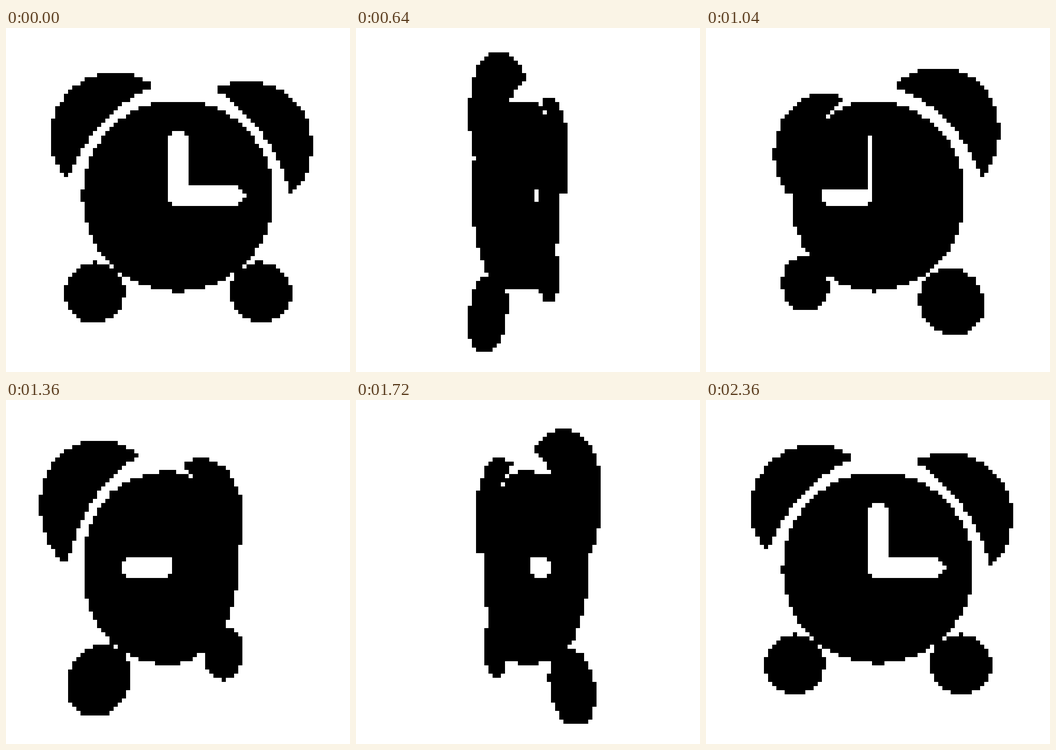
Recreate the animation shown at these times as an HTML page with a canvas. Size 748 px wide and 748 px high, loop 2400 ms.

```html
<!DOCTYPE html>
<html lang="en">
<head>
<meta charset="utf-8">
<title>Turning alarm clock</title>
<style>
  html, body { margin: 0; width: 100%; height: 100%; overflow: hidden; background: #fff; }
  canvas { display: block; width: 748px; height: 748px; }
</style>
</head>
<body>
<canvas id="stage" width="748" height="748"></canvas>
<script>
const ctx = document.getElementById("stage").getContext("2d");

// All lengths are in grid cells.
const CELLS = 83, CELL_SIZE = 9.04;
const CENTER_X = 41.55, CENTER_Y = 41.5, CAMERA = 98;
const AXIS_X = -1, AXIS_Y = -0.9, MODEL_SHIFT = 0.9;
const STEPS = 60, STEP_MS = 40, LEAD = 0.9;
const BODY_RADIUS = 22.35, HALF_DEPTH = 2.65, HALF_SLICES = 9;
const HAND_LENGTH = 14.35, HAND_RADIUS = 2.2;
const BELL_ANGLES = [-46.6, 54.2].map(deg => deg * Math.PI / 180);

const edgeX = n => Math.round(n * CELL_SIZE - 1);
const edgeY = n => Math.round(n * CELL_SIZE - 1.5);
const beyond = (value, end) => value - Math.min(Math.max(value, 0), end);

function inHands(x, y) {
  return Math.hypot(x, beyond(-y, HAND_LENGTH)) < HAND_RADIUS ||
         Math.hypot(beyond(x, HAND_LENGTH), y) < HAND_RADIUS;
}

const inBody = (x, y) => Math.hypot(x, y) < BODY_RADIUS && !inHands(x, y);

const inFeet = (x, y) => Math.hypot(Math.abs(x) - 19.95, y - 23.1) < 7.1;

function inBell(x, y, angle) {
  const c = Math.cos(angle), s = Math.sin(angle);
  const across = x * c + y * s, along = y * c - x * s;
  return Math.hypot(across, along + 20.2) < 15.1 &&
         along < -22.2 - 2.8 * (1 - (across / 14.9) ** 2);
}

function isSolid(x, y, z) {
  return inBody(x, y) ||
         (Math.abs(z) < 1 && inFeet(x, y)) ||
         (z > 0.8 && BELL_ANGLES.some(angle => inBell(x, y, angle)));
}

// Looks through one cell and tests every depth slice of the turned model.
function isCovered(u, v, c, s) {
  for (let i = -HALF_SLICES; i <= HALF_SLICES; i++) {
    const z = HALF_DEPTH * i / HALF_SLICES;
    const x = (CAMERA * (z * s + AXIS_X - u) + u * z * c) / (u * s - CAMERA * c);
    const depth = 1 - (z * c - x * s) / CAMERA;
    if (depth > 0 && isSolid(x - MODEL_SHIFT, v * depth - AXIS_Y, z)) return true;
  }
  return false;
}

function draw(step) {
  const p = (step + LEAD) / STEPS;
  const turn = 2 * Math.PI * p * p * (3 - 2 * p);
  const c = Math.cos(turn), s = Math.sin(turn);
  ctx.fillStyle = "#fff";
  ctx.fillRect(0, 0, 748, 748);
  ctx.fillStyle = "#000";
  for (let row = 0; row < CELLS; row++) {
    const top = edgeY(row), height = edgeY(row + 1) - top;
    for (let col = 0; col < CELLS; col++) {
      if (isCovered(col + 0.5 - CENTER_X, row + 0.5 - CENTER_Y, c, s)) {
        const left = edgeX(col);
        ctx.fillRect(left, top, edgeX(col + 1) - left, height);
      }
    }
  }
}

let shown = -1;
function tick() {
  const step = Math.floor(performance.now() / STEP_MS) % STEPS;
  if (step !== shown) draw(shown = step);
  requestAnimationFrame(tick);
}
tick();
</script>
</body>
</html>
```
